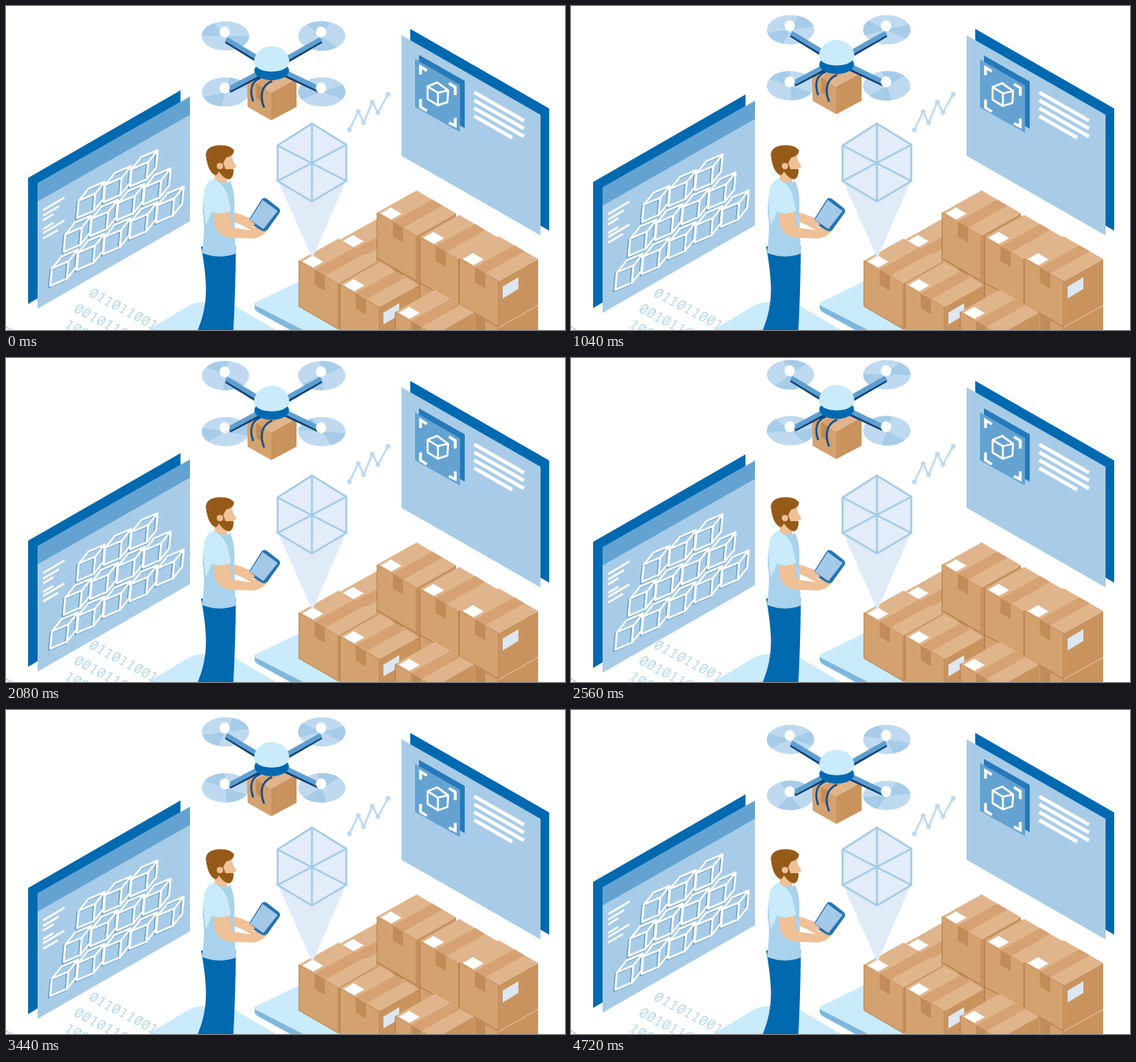
These frames come from a looping animation (708 by 411 pixels, 4.8 s). An HTML page:

```html
<!DOCTYPE html>
<html lang="en">
<head>
<meta charset="utf-8">
<title>Smart warehouse</title>
<style>
  html, body { margin: 0; width: 100%; height: 100%; overflow: hidden; background: #fff; }
  svg { display: block; width: 708px; height: 411px; }
  .dark { fill: #0069b0; }
  .mid { fill: #64a3d1; }
  .pale { fill: #a8cce7; }
  .ice { fill: #c9ebfc; }
  .skin { fill: #f0c097; }
  .hair { fill: #965a18; }
  .white { fill: none; stroke: #fff; }
  .digits { font: 500 18px "Noto Sans Mono", "DejaVu Sans Mono", monospace; fill: #b9d9ef; }
</style>
</head>
<body>
<svg viewBox="0 0 708 411">
  <!-- floor -->
  <path class="ice" d="M180 411L230 381Q240 375 252 376L284 377L342 411Z"/>
  <path fill="#7fb7dd" d="M315 377V384Q316 387 322 390L360 411H430V360Z"/>
  <path class="ice" d="M318 375L372 349L500 400V411H376L320 382Q311 379 318 375Z"/>
  <g class="digits">
    <text transform="matrix(.87 .46 -.6 .8 103 367)">011011001</text>
    <text transform="matrix(.87 .46 -.6 .8 84 387)">001011010</text>
    <text transform="matrix(.87 .46 -.6 .8 72 407)">10010</text>
  </g>
  <path d="M0 407L7 411" stroke="#b9d9ef" stroke-width="2"/>

  <!-- label screen -->
  <path class="dark" d="M512 29L688 130V285L512 184Z"/>
  <path class="pale" d="M501 37L677 138V291L501 190Z"/>
  <path class="white" stroke-width="4.500" d="M593 109.500l63 36M593 119.500l63 36M593 129.500l63 36M593 139.500l48 27.500"/>
  <g id="scanner">
    <path fill="#2679ba" d="M523 62L581 95V155L523 122Z"/>
    <path class="mid" d="M518 67L575 100V160L518 128Z"/>
    <path class="white" stroke-width="3.500" d="M525 87V77L533 82M561 98L569 103V113M525 118V128L533 133M561 148L569 152V142"/>
    <path class="white" stroke-width="2.500" stroke-linejoin="round" d="M534 102L546 97L560 107L559 122L547 126L534 118ZM534 102L547 110L560 107M547 110V126"/>
  </g>

  <!-- trend line -->
  <g fill="none" stroke="#bdd9ef" stroke-linecap="round">
    <path stroke-width="2.500" d="M435 157L446 134L453 148L464 122L471 135L484 112"/>
    <path stroke-width="6" d="M435 157h0M446 134h0M453 148h0M464 122h0M471 135h0M484 112h0"/>
  </g>

  <g id="boxes"></g>

  <!-- hologram -->
  <path fill="#e0ebf8" d="M345 223L387 247L430 223L388 320Z"/>
  <path fill="#e2edf9" stroke="#a5cae7" stroke-width="2.500" stroke-linejoin="round"
    d="M387.500 149L431 176V222L387.500 248L344 222V177ZM387.500 149V248M344 177L431 222M431 176L344 222"/>

  <g id="screen">
    <path class="dark" d="M28 218L221 107V262L28 378Z"/>
    <path class="pale" d="M40 225L233 115V273L40 384Z"/>
    <path class="mid" d="M40 225L233 115V138L40 248Z"/>
    <path class="white" stroke-width="2.500" d="M47 259L74 243M47 266L67 254M47 272L60 264M47 283L60 275M47 288L74 272M47 295L66 284"/>
    <g id="cells" fill="none" stroke-linejoin="round"></g>
  </g>

  <!-- worker -->
  <path class="dark" d="M247 305H291Q291 350 288 411H243Q255 382 253 352Q252 330 247 305Z"/>
  <path class="skin" d="M265 205L280 212L280 226L264 224Z"/>
  <path fill="#a9d2ec" d="M262 219Q275 227 284 222Q291 238 289 262L291 314Q270 322 248 313Q253 282 249 260Q249 231 262 219Z"/>
  <path class="skin" d="M289 262Q302 265 316 273L310 282L289 274Z"/>
  <path class="skin" d="M263 258L283 258L286 281L308 284L325 277L333 281Q328 292 314 295L284 294Q267 291 264 275Z"/>
  <path class="ice" d="M262 219Q277 226 281 241L285 260Q272 266 261 261L253 278Q248 245 252 231Q255 222 262 219Z"/>
  <path class="skin" d="M268 188L286 187L287 195L292 204L287 207L286 217L270 215Z"/>
  <path class="hair" d="M253 188Q254 179 266 177Q282 175 289 183Q288 191 279 192L275 199L278 207L288 207Q289 217 283 220Q275 219 270 210L266 215Q255 211 253 188Z"/>
  <circle class="skin" cx="271" cy="203" r="4"/>
  <path fill="#2672b1" d="M324 245Q327 242 331 245L345 256Q349 259 346 263L331 284Q328 287 324 285L309 276Q306 273 309 269Z"/>
  <path fill="#a3cae8" d="M325 246L344 260L326 283L309 271Z"/>
  <path class="skin" d="M292 266L309 271L316 277L311 279L318 283L308 283L292 274Z"/>

  <!-- drone -->
  <g id="drone">
    <g id="rotors"></g>
    <path fill="#e0b58c" d="M305 91L337 74L368 92L336 110Z"/>
    <path fill="#d4a26f" d="M305 91L336 110V145L306 128Z"/>
    <path fill="#c9935e" d="M336 110L368 92V128L336 145Z"/>
    <path fill="#d6a273" d="M317 98L345 82L354 87L326 104Z"/>
    <path fill="#c08c58" d="M317 98L326 104V122L317 117Z"/>
    <path d="M323 91C311 95 308 106 313 121M337 95C323 101 321 115 327 129" fill="none" stroke="#0d4f8d" stroke-width="2.500"/>
    <path d="M279 44L337 80L399 44M283 107L337 79L397 107" fill="none" stroke="#0c3e74" stroke-width="6.500"/>
    <path d="M279 42L337 77L399 42M283 105L337 76L397 105" fill="none" stroke="#5f9fd0" stroke-width="6"/>
    <ellipse class="dark" cx="336.500" cy="82" rx="22" ry="12"/>
    <path class="ice" d="M314 72C315 44 358 44 359 72C356 87 317 87 314 72Z"/>
    <g id="hubs"></g>
  </g>
</svg>
<script>
const $ = id => document.getElementById(id);
const poly = (points, fill, extra = '') => `<polygon points="${points.join(' ')}" fill="${fill}" ${extra}/>`;

// Parcel seen from above; (x, y) is the front corner of its lid.
function parcel(x, y, tag) {
  const edge = (u, v = 0, drop = 0) => [x - 50 + 50 * (u + v), y - 29 + 29 * u - 28 * v + drop];
  const seam = 'stroke="#99693b" stroke-width=".7"';
  return poly([edge(0), edge(1), edge(1, 0, 58), edge(0, 0, 58)], '#d4a26f', seam)
    + poly([edge(1), edge(1, 1), edge(1, 1, 58), edge(1, 0, 58)], '#c9935e')
    + poly([edge(0), edge(0, 1), edge(1, 1), edge(1)], '#e0b58c')
    + poly([edge(.4), edge(.4, 1), edge(.66, 1), edge(.66)], '#d6a273')
    + poly([edge(.4), edge(.66), edge(.66, 0, 19), edge(.4, 0, 19)], '#c08c58')
    + poly([edge(.06, .03), edge(.06, .29), edge(.33, .29), edge(.33, .03)], '#fff')
    + (tag ? poly([[x + 5, y + 7], [x + 25, y - 5], [x + 25, y + 10], [x + 5, y + 22]], '#dce7ef') : '');
}

// Open wireframe crate on the tilted screen.
function crate(row, col) {
  const x = 58 + 33.5 * col + 17 * row, y = 333 - 20 * col - 43 * row;
  const shape = `M${x} ${y}l21 -9l-2 22l-21 9zl12 -15l21 -9l-12 15m12 -15l-2 22l-12 15`;
  return `<path d="${shape}" transform="translate(-1.5 1.5)" stroke="#5c9bcd" stroke-width="2.5"/>
    <path d="${shape}" class="white" stroke-width="2.5"/>`;
}

$('boxes').innerHTML = [
  [472, 326], [520, 349], [520, 291, true], [574, 380], [624, 408], [574, 322],
  [624, 349, true], [421, 352], [473, 382, true], [543, 417]
].map(args => parcel(...args)).join('');

$('cells').innerHTML = [2, 1, 0].map(row =>
  Array.from({ length: 5 - row }, (_, i) => crate(row, 4 - row - i)).join('')).join('');

const hubs = [[278, 38], [400, 38], [278, 109], [400, 109]];
$('rotors').innerHTML = hubs.map(([x, y]) => `<g transform="translate(${x} ${y}) scale(1 .62)">
  <circle r="30" fill="#bfdaf0"/>
  <path class="blades" fill="#a6cce8" d="M0 0L30 0A30 30 0 0 1 15 26L-15 -26A30 30 0 0 0 -30 0Z"/></g>`).join('');
$('hubs').innerHTML = hubs.map(([x, y]) =>
  `<ellipse cx="${x - 1}" cy="${y - 5}" rx="6.5" ry="7" fill="#fff"/>`).join('');
const blades = document.querySelectorAll('.blades');

const LOOP = 4800, STEP = 80;
const shift = (id, y) => $(id).setAttribute('transform', `translate(0 ${y})`);

function draw(now) {
  const t = Math.floor(now % LOOP / STEP) * STEP;
  const swing = 1 - Math.abs(1 - t / (LOOP / 2));
  shift('drone', -18 * swing);
  shift('screen', Math.max(0, 20 * swing - 3.5));
  shift('scanner', 2 * swing);
  blades.forEach((blade, i) => blade.setAttribute('transform', `rotate(${t * .45 + i * 50})`));
  requestAnimationFrame(draw);
}
draw(0);
</script>
</body>
</html>
```
